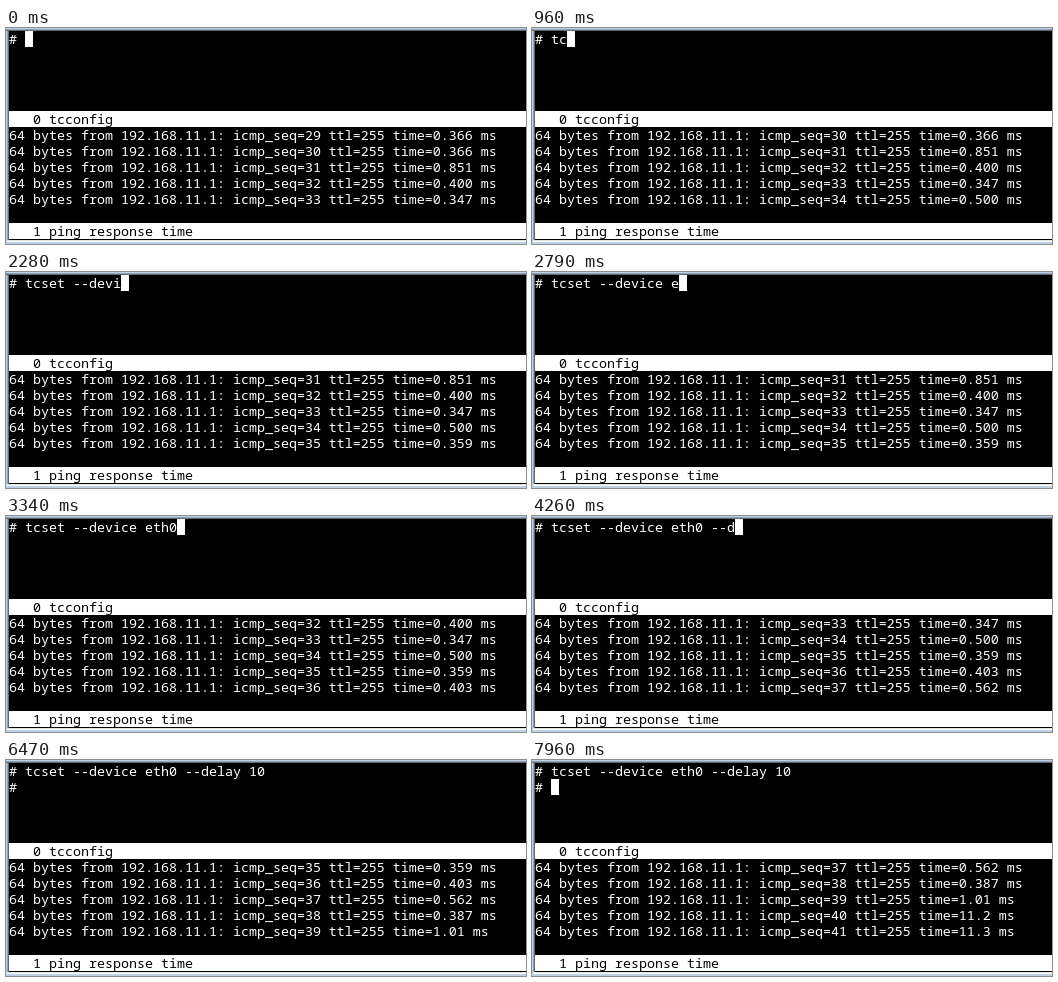
These frames come from a looping animation (520 by 216 pixels, 8000 ms). An HTML page:

```html
<!DOCTYPE html>
<html lang="en">
<head>
<meta charset="utf-8">
<title>Terminal</title>
<style>
  html, body { margin: 0; width: 100%; height: 100%; overflow: hidden; background: #000; }
  #term {
    position: relative; width: 520px; height: 216px; overflow: hidden;
    background: #000; color: #fff;
    font: 13.3333px/16px "Noto Sans Mono", "DejaVu Sans Mono", monospace;
    font-variant-ligatures: none;
  }
  #term > * { position: absolute; margin: 0; font: inherit; white-space: pre; }
  .text { left: 3px; }
  .bar { left: 3px; right: 0; height: 16px; background: #fff; color: #000; }
  #cursor { width: 8px; height: 16px; background: #fff; }
  /* Window frame, then the two shades of the sunken edge. */
  .edge-top { left: 0; right: 0; top: 0; height: 1px; background: #a0a0a0;
    border-top: 1px solid #b9d1ea; border-bottom: 1px solid #696969; }
  .edge-left { left: 0; top: 1px; bottom: 0; width: 1px; background: #a0a0a0;
    border-left: 1px solid #b9d1ea; border-right: 1px solid #696969; }
  .edge-bottom { left: 1px; right: 0; top: 212px; height: 1px; background: #fff;
    border-top: 1px solid #e3e3e3; border-bottom: 2px solid #b9d1ea; }
</style>
</head>
<body>
<div id="term">
  <pre id="shell" class="text" style="top:3px"></pre>
  <div id="cursor"></div>
  <pre class="bar" style="top:83px">   0 tcconfig</pre>
  <pre id="ping" class="text" style="top:99px"></pre>
  <pre class="bar" style="top:195px">   1 ping response time</pre>
  <div class="edge-left"></div>
  <div class="edge-top"></div>
  <div class="edge-bottom"></div>
</div>
<script>
const LOOP = 8000, BLINK = 530, CELL = 8, ROW = 16, PAD = 3;
const ENTER = 5820, PROMPT = 5940;
const FIRST_SEQ = 29, VISIBLE = 5;

const command = "tcset --device eth0 --delay 10";
const keyTimes = [
  560, 840, 1080, 1200, 1320, 1470, 1620, 1740, 1860, 2010,
  2130, 2280, 2400, 2550, 2670, 2790, 2940, 3060, 3340, 3590,
  3890, 4010, 4260, 4540, 4540, 4690, 4840, 4960, 5240, 5390
];
const replyTimes = [960, 2010, 2940, 3890, 4960, 5940, 6870, 7960];
const latencies = ["0.366", "0.366", "0.851", "0.400", "0.347", "0.500", "0.359",
  "0.403", "0.562", "0.387", "1.01", "11.2", "11.3"];

const replies = latencies.map((ms, i) =>
  `64 bytes from 192.168.11.1: icmp_seq=${FIRST_SEQ + i} ttl=255 time=${ms} ms`);
const outputs = [...keyTimes, ...replyTimes, ENTER, PROMPT];

const [shell, cursor, ping] = ["shell", "cursor", "ping"].map(id => document.getElementById(id));
const countUntil = (times, t) => times.filter(x => x <= t).length;

function setText(el, text) {
  if (el.textContent !== text) el.textContent = text;
}

function draw(t) {
  const lines = ["# " + command.slice(0, countUntil(keyTimes, t))];
  if (t >= ENTER) lines.push(t >= PROMPT ? "# " : "");
  setText(shell, lines.join("\n"));

  const row = lines.length - 1;
  cursor.style.left = PAD + lines[row].length * CELL + "px";
  cursor.style.top = PAD + row * ROW + "px";

  // Any output in either pane restarts the cursor blink.
  const past = outputs.filter(x => x <= t);
  const idle = past.length ? t - Math.max(...past) : 0;
  cursor.style.visibility = idle >= BLINK ? "hidden" : "visible";

  const first = countUntil(replyTimes, t);
  setText(ping, replies.slice(first, first + VISIBLE).join("\n"));
}

function tick() {
  draw(performance.now() % LOOP);
  requestAnimationFrame(tick);
}
tick();
</script>
</body>
</html>
```
